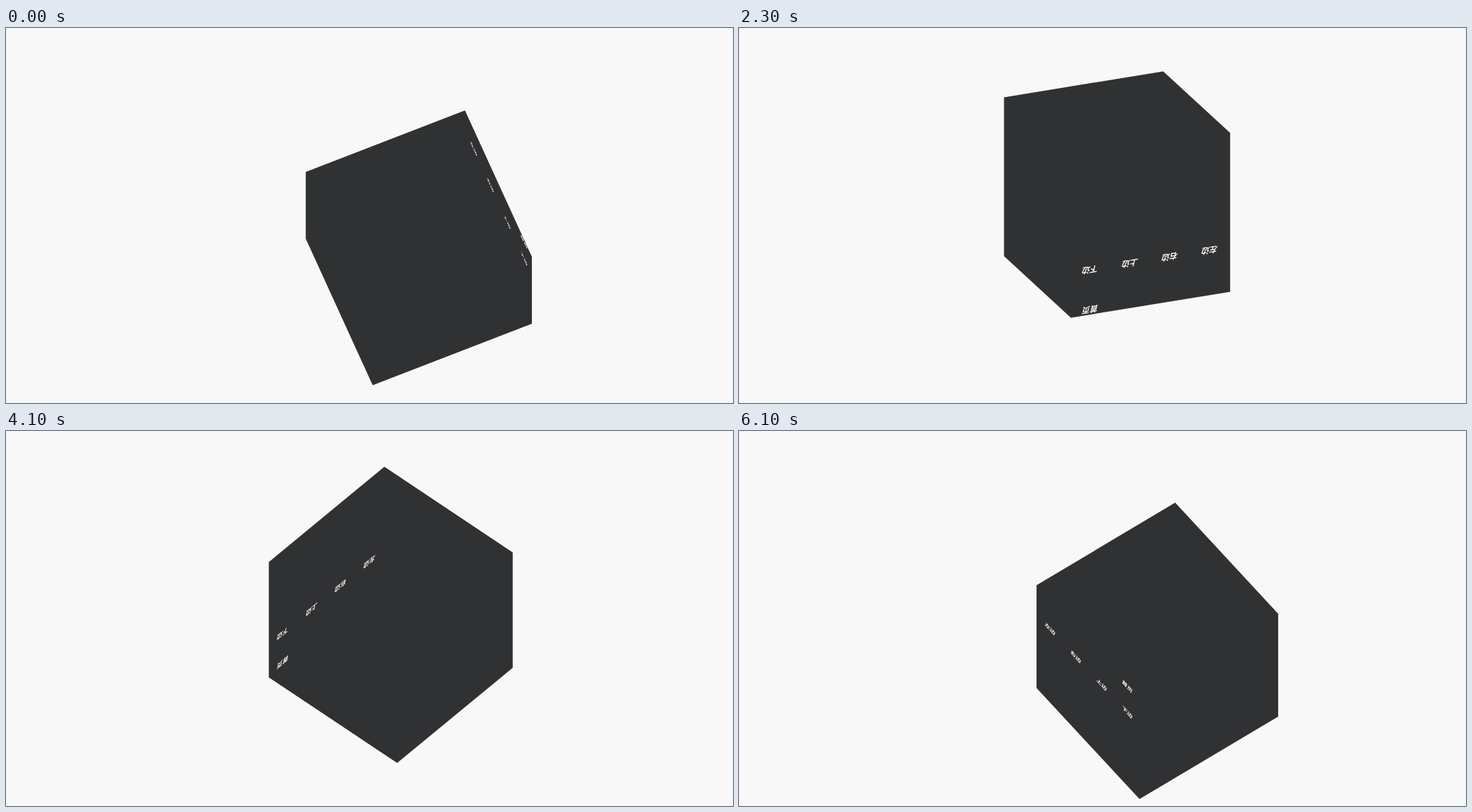
Recreate the animation shown at these times as an HTML page. Size 1041 by 538 pixels, loop 6.2 s.

```html
<!DOCTYPE html>
<html lang="zh-CN">
<head>
<meta charset="utf-8">
<title>Rotating cube</title>
<style>
  html, body { margin: 0; width: 100%; height: 100%; overflow: hidden; background: #f8f8f8; }
  svg { display: block; width: 100%; height: 100%; }
  text { font: italic bold 12.2px "Noto Sans CJK SC", "Noto Sans CJK", sans-serif; fill: #fff; text-anchor: middle; }
</style>
</head>
<body>
<svg viewBox="0 0 1041 538">
  <polygon id="cube" fill="#303133"/>
  <g id="front"></g>
</svg>
<script>
  const LOOP = 6200, STEP = 100;
  const SIDE = 247.3, HALF = SIDE / 2, CELL = SIDE / 4;
  const PIVOT = [576.4, 268.3], OFFSET = 38;
  // The turn advances in whole ticks of 0.6 degrees, about 6.5 per step.
  const START = 67.2, TICK = 0.6, TICKS_PER_STEP = 6.53, PHASE = 0.75;

  const cube = document.getElementById('cube');
  const front = document.getElementById('front');

  function addLabel(label, col, row) {
    const el = document.createElementNS('http://www.w3.org/2000/svg', 'text');
    el.setAttribute('x', -HALF + CELL * (col + 0.5) + 0.4);
    el.setAttribute('y', -111 + CELL * row);
    el.textContent = label;
    front.appendChild(el);
  }
  addLabel('首页', 3, 0);
  ['左边', '右边', '上边', '下边'].forEach((label, i) => addLabel(label, i, 1));

  // Outline of a projected box: walk its edge vectors in order of angle.
  function outline(center, axes) {
    const edges = axes
      .map(([x, y]) => (x < 0 || (x === 0 && y > 0) ? [-x, -y] : [x, y]))
      .sort((a, b) => Math.atan2(a[1], a[0]) - Math.atan2(b[1], b[0]));
    let [x, y] = center;
    for (const e of edges) { x -= e[0] / 2; y -= e[1] / 2; }
    const points = [];
    for (const sign of [1, -1]) {
      for (const e of edges) {
        points.push(x.toFixed(2) + ',' + y.toFixed(2));
        x += sign * e[0];
        y += sign * e[1];
      }
    }
    return points.join(' ');
  }

  // rotateX(a) rotateY(a) without perspective, around a pivot off the cube's centre
  function draw(ms) {
    const step = Math.floor((ms % LOOP) / STEP);
    const ticks = Math.floor(step * TICKS_PER_STEP + PHASE);
    const a = (START + TICK * ticks) * Math.PI / 180;
    const c = Math.cos(a), s = Math.sin(a);
    const ax = [c, s * s], ay = [0, c], az = [s, -s * c];
    const center = PIVOT.map((p, i) => p + OFFSET * (ax[i] + ay[i]));
    const face = center.map((p, i) => p + HALF * az[i]);
    const axes = [ax, ay, az].map(v => v.map(n => n * SIDE));
    cube.setAttribute('points', outline(center, axes));
    front.setAttribute('transform', `matrix(${[...ax, ...ay, ...face].join(' ')})`);
  }

  let begin = null;
  function tick(now) {
    if (begin === null) begin = now;
    draw(now - begin);
    requestAnimationFrame(tick);
  }
  draw(0);
  requestAnimationFrame(tick);
</script>
</body>
</html>
```
